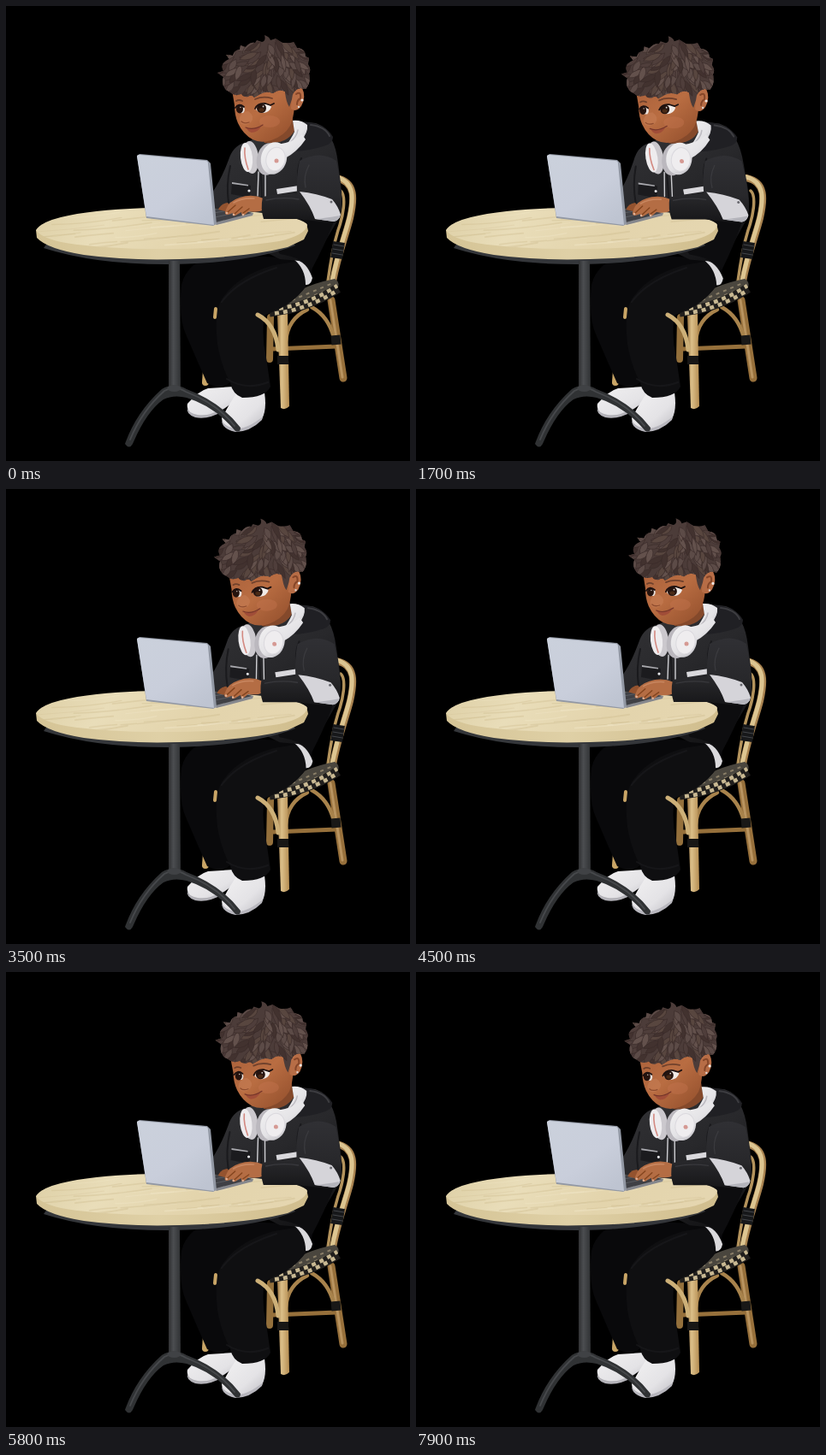
These frames come from a looping animation (472x532 px, 8000 ms). An HTML page:

```html
<!DOCTYPE html>
<html lang="en">
<head>
<meta charset="utf-8">
<title>Working at a café table</title>
<style>
html, body { margin: 0; width: 100%; height: 100%; overflow: hidden; background: #000; }
svg { display: block; width: 100vw; height: 100vh; }
.line { fill: none; stroke-linecap: round; stroke-linejoin: round; }
</style>
</head>
<body>
<svg viewBox="0 0 472 532">
  <defs>
    <linearGradient id="wood" x2="1" y2=".12">
      <stop stop-color="#ddcfa5"/><stop offset=".3" stop-color="#e9ddb9"/>
      <stop offset=".65" stop-color="#e3d4ac"/><stop offset="1" stop-color="#e5d6b0"/>
    </linearGradient>
    <linearGradient id="rim">
      <stop stop-color="#d5c496"/><stop offset=".45" stop-color="#dfd0a6"/><stop offset="1" stop-color="#d0bd8d"/>
    </linearGradient>
    <linearGradient id="lid" x2=".8" y2="1">
      <stop stop-color="#cbd1dc"/><stop offset=".6" stop-color="#c9cedb"/><stop offset="1" stop-color="#bec4d1"/>
    </linearGradient>
    <linearGradient id="skin" x2=".9" y2="1">
      <stop stop-color="#a9603a"/><stop offset=".5" stop-color="#b96d42"/><stop offset="1" stop-color="#94502d"/>
    </linearGradient>
    <linearGradient id="coat" x2=".6" y2="1">
      <stop stop-color="#343437"/><stop offset=".55" stop-color="#28282b"/><stop offset="1" stop-color="#151517"/>
    </linearGradient>
    <linearGradient id="sleeve" x2="0" y2="1">
      <stop stop-color="#303034"/><stop offset=".6" stop-color="#28282b"/><stop offset="1" stop-color="#161618"/>
    </linearGradient>
    <linearGradient id="white" x2="1" y2="1">
      <stop stop-color="#f2f1f2"/><stop offset=".6" stop-color="#e4e3e6"/><stop offset="1" stop-color="#bcbbc1"/>
    </linearGradient>
    <linearGradient id="cane">
      <stop stop-color="#9a7440"/><stop offset=".35" stop-color="#dcc08a"/><stop offset="1" stop-color="#b58d52"/>
    </linearGradient>
    <linearGradient id="metal">
      <stop stop-color="#2f3032"/><stop offset=".4" stop-color="#4b4d50"/><stop offset="1" stop-color="#303234"/>
    </linearGradient>
    <clipPath id="hairClip"><use href="#hair"/></clipPath>
    <clipPath id="topClip"><use href="#top"/></clipPath>
  </defs>

  <!-- chair -->
  <g class="line">
    <path stroke="#c9a566" stroke-width="8" d="M234 426L233 440"/>
    <path stroke="#94703c" stroke-width="8" d="M309 364L308 413"/>
    <path stroke="#96703b" stroke-width="5" d="M312 401L386 398"/>
    <path stroke="#97703b" stroke-width="9" d="M380 344L394 435"/>
    <path stroke="#b99460" stroke-width="3" d="M379 344L393 434"/>
    <path stroke="#a8834c" stroke-width="4.500" d="M357 352Q377 363 383 388M352 355Q329 366 327 392"/>
    <path stroke="#a98350" stroke-width="8" d="M386 201C409 206 407 226 402 248C397 268 388 290 382 322"/>
    <path stroke="#dcc591" stroke-width="5" d="M386 200C408 206 406 226 401 248C396 268 387 290 381 322"/>
    <path stroke="#b4935c" stroke-width="3.500" d="M391 216C398 222 394 246 388 262Q381 285 376 322"/>
    <path stroke="#17181a" stroke-width="14" stroke-linecap="butt" d="M389 276L386 295"/>
    <path stroke="#44464a" d="M383 279L395 281M382 284L394 286M381 289L393 291"/>
    <path stroke="#191817" stroke-width="11" stroke-linecap="butt" d="M385 385L386 396"/>
  </g>
  <path fill="#4a463e" d="M314 353Q338 328 384 319Q392 324 386 332Q350 352 314 353Z"/>
  <g class="line" style="stroke-linecap:butt">
    <path stroke="#8c8069" stroke-width="2" stroke-dasharray="4 5" d="M334 344L382 324M352 342L385 328"/>
    <path stroke="#211f1d" stroke-width="11" d="M308 358Q350 354 388 330"/>
    <path stroke="#c8b892" stroke-width="4.500" stroke-dasharray="5 5" d="M309 355Q350 351 387 327"/>
    <path stroke="#c8b892" stroke-width="4.500" stroke-dasharray="5 5" stroke-dashoffset="5" d="M309 360Q351 356 388 332"/>
  </g>
  <path fill="url(#cane)" d="M317 362L329 360L331 468Q326 473 321 470Z"/>
  <path fill="#171615" d="M317 409h13v10h-13z"/>

  <!-- legs and shoes -->
  <path fill="url(#white)" d="M236 447Q225 450 212 465Q210 475 222 480Q238 483 256 470L273 458L266 445Z"/>
  <path fill="#b4b3b9" d="M212 470Q213 476 224 478Q238 480 251 471L253 474Q236 484 221 481Q210 477 212 470Z"/>
  <path fill="url(#white)" d="M270 452Q262 463 252 482Q253 494 270 497Q283 497 299 483Q305 472 302 452Z"/>
  <path fill="#b8b7be" d="M252 485Q257 493 270 494Q283 494 300 480L299 484Q285 498 268 498Q253 495 252 485Z"/>
  <path fill="#09090b" d="M250 290L358 296Q360 325 338 340L300 364L262 440Q252 449 235 441Q223 414 211 386Q201 366 205 326Q212 297 250 290Z"/>
  <path fill="#0f0f11" d="M356 318Q340 350 302 361Q298 386 304 411L309 445Q303 458 276 458Q265 454 262 441Q247 411 246 384Q244 355 252 343Q270 315 313 303L355 296Z"/>
  <g class="line">
    <path stroke="#1a1a1d" stroke-width="2" d="M252 346Q270 321 316 306M258 436Q280 450 306 440" opacity=".7"/>
    <path stroke="#c9a566" stroke-width="4" d="M245 354L244 364"/>
    <path stroke="#cdb078" stroke-width="5" d="M294 361Q315 372 318 402"/>
  </g>

  <g class="lean">
    <!-- torso -->
    <path fill="#dad9dc" d="M336 296Q351 298 358 318Q356 327 350 326Q350 307 336 296Z"/>
    <path fill="url(#coat)" d="M278 160Q265 164 260 180Q251 204 241 218L239 256L320 296L354 299Q365 292 376 270L388 250Q395 236 391 207L388 184Q386 166 380 155Q377 142 362 137L345 135Z"/>
    <path fill="#0d0d0f" d="M293 244L384 249Q373 279 357 308Q347 294 320 290Z"/>
    <path fill="#202024" d="M348 136Q372 136 382 153Q382 160 374 163Q356 169 337 170Z"/>
    <path class="line" stroke="#3d3d41" stroke-width="2" d="M356 139Q373 141 378 152"/>
    <path class="line" stroke="#1a1a1d" stroke-width="2" d="M262 187Q257 209 260 230M298 197L299 228M345 178Q337 197 345 213"/>
    <path fill="#1b1b1e" d="M264 207L286 210L285 224L263 220Z"/>
    <path fill="#a9a9ae" d="M264 206L283 209L283 210.500L264 208Z"/>
    <path fill="#d9d8dc" d="M316 214L342 210L343 216L317 220Z"/>
    <g class="line" stroke="#cfcfd3" stroke-width="1.400"><path d="M295 194L294 222M303 194L303 223"/></g>
    <circle cx="284" cy="216" r="1.600" fill="#e8e8eb"/>
    <!-- neck and collar -->
    <path fill="#84492b" d="M294 146L334 126L337 146Q328 162 302 160Z"/>
    <path fill="url(#white)" d="M335 134Q345 133 352 139Q353 148 345 157L326 165Q334 154 337 147Z"/>
    <path class="line" stroke="#bcbac0" stroke-width="1.500" d="M341 145Q340 153 330 161"/>
    <!-- headphones -->
    <path fill="url(#white)" d="M317 162Q337 159 346 150L350 156Q340 171 326 178Z"/>
    <ellipse cx="286" cy="177" rx="9" ry="19" fill="#cbc8cd" transform="rotate(-6 286 177)"/>
    <ellipse cx="281" cy="177" rx="7" ry="17" fill="#eeecee" transform="rotate(-6 281 177)"/>
    <path class="line" stroke="#d38981" stroke-width="1.600" d="M279 166Q278 177 283 191"/>
    <ellipse cx="306" cy="179" rx="13" ry="19" fill="#bbb8be" transform="rotate(12 306 179)"/>
    <ellipse cx="313" cy="178" rx="15" ry="19" fill="url(#white)" transform="rotate(14 313 178)"/>
    <ellipse cx="315" cy="179" rx="11" ry="14" fill="#efedef" stroke="#dbd9de" transform="rotate(14 315 179)"/>
    <circle cx="316" cy="181" r="2.500" fill="#d59993"/>
  </g>

  <!-- head -->
  <g id="head">
    <path fill="url(#skin)" d="M263 92L267 116Q267 128 271 137Q277 150 288 156Q298 161 310 157Q325 152 332 140Q336 131 337 118L335 88Z"/>
    <path fill="#c88057" d="M277 124Q270 132 274 137Q280 141 286 136Q292 129 283 123Z" opacity=".5"/>
    <ellipse cx="308" cy="135" rx="12" ry="7" fill="#c67650" opacity=".4"/>
    <path class="line" stroke="#8f4d2f" stroke-width="1.300" d="M275 135Q278 138 284 136"/>
    <path fill="#a04d38" d="M281 143Q287 145 298 141Q294 148 287 148Q283 147 281 143Z"/>
    <path class="line" stroke="#75352a" stroke-width="1.200" d="M280 142Q289 146 300 139"/>
    <path fill="#b76d46" d="M334 101Q339 92 346 96Q351 106 345 117Q339 125 333 120Z"/>
    <path class="line" stroke="#854629" stroke-width="2" d="M339 103Q345 99 344 108Q340 110 340 115"/>
    <circle cx="346" cy="110" r="1.600" fill="#eee7e4"/><circle cx="342" cy="118" r="1.200" fill="#ddd5d2"/>
    <!-- eyes -->
    <path fill="#e9e1dc" d="M269 119Q273 114 278 118Q280 122 277 125Q271 126 269 119Z"/>
    <path fill="#f1ebe7" d="M292 121Q294 114 302 114Q309 115 310 118Q308 124 301 125Q295 125 292 121Z"/>
    <g id="gaze">
      <ellipse cx="273" cy="120.500" rx="4" ry="5" fill="#25130e"/>
      <ellipse cx="298.500" cy="119.500" rx="5.500" ry="5.500" fill="#25130e"/>
      <ellipse cx="298.500" cy="121.500" rx="3" ry="2.200" fill="#4a2a16"/>
      <g fill="#d9d2cc"><circle cx="274" cy="118.500" r=".7"/><circle cx="300.500" cy="117.500" r=".9"/></g>
    </g>
    <path class="line" stroke="#1d1110" stroke-width="1.800" d="M268 119Q272 113 278 118M291 120Q294 113 303 114L309 116L313 114"/>
    <path class="line" stroke="#70412c" stroke-width="1.800" d="M269 111Q272 109 276 111M291 109Q300 105 311 108"/>
    <!-- hair -->
    <path id="hair" fill="#4c3c39" d="M257 98Q251 91 254 83L247 78L254 76Q249 67 261 62L257 57L265 58Q267 51 273 51L274 46L280 48Q285 42 291 43L293 40L299 42Q304 41 302 34Q308 36 309 40L315 38L323 43Q331 44 336 42L340 49Q350 50 350 59L354 61L353 68Q357 74 354 79Q357 89 350 97L344 96Q335 97 334 109L331 118Q327 112 326 100Q319 96 312 102Q304 99 297 103L290 107Q287 103 283 106Q278 107 275 103Q267 106 262 101Z"/>
    <g id="tufts" clip-path="url(#hairClip)"></g>
  </g>

  <!-- table -->
  <path fill="#34363a" d="M44 283Q106 303 195 302Q287 300 338 280L331 273L51 273Z"/>
  <path fill="url(#metal)" d="M190 298h13l1 151h-14z"/>
  <path fill="#303234" d="M139 512Q152 475 182 448Q196 439 211 448Q251 463 274 493Q274 499 268 497Q244 468 211 458Q196 454 184 460Q164 474 148 512Q144 519 139 512Z"/>
  <path class="line" stroke="#47494c" stroke-width="1.800" d="M145 507Q159 473 185 450Q197 443 210 451Q247 465 267 491"/>
  <ellipse cx="196.500" cy="447" rx="8" ry="4" fill="#404245"/>
  <path fill="url(#rim)" d="M35 262L36 271Q48 284 91 291Q143 298 203 296Q281 294 329 282L348 273L353 263L351 254Z"/>
  <path id="top" fill="url(#wood)" d="M35 262Q42 251 73 245Q112 237 175 236Q250 236 308 243Q348 248 352 256Q350 268 319 275Q269 283 199 284Q120 285 70 277Q42 272 35 262Z"/>
  <g id="grain" class="line" clip-path="url(#topClip)"></g>

  <!-- laptop deck -->
  <path fill="#85878d" d="M240 239L263 235L289 242L288 245L246 256L242 253Z"/>
  <path fill="#3f4045" d="M242 238L263 235L287 242L245 253Z"/>
  <path class="line" stroke="#606268" stroke-width=".8" d="M243 242L270 237M244 247L277 240"/>

  <g class="lean">
    <path id="far" fill="#94532f" d="M248 238Q251 231 259 230L264 236L256 240Z"/>
    <g id="hand">
      <path fill="#b46d44" d="M257 238Q260 228 273 224Q287 219 301 225L302 238Q294 242 284 240L279 244Q275 246 275 241L268 245Q264 246 265 242L259 244Q254 244 257 238Z"/>
      <path class="line" stroke="#84451f" stroke-width="1.400" d="M259 241L268 233M267 243L276 235M277 242L284 237"/>
      <path class="line" stroke="#c98760" stroke-width="1.600" d="M266 230Q276 224 290 225"/>
      <g fill="#deb096"><circle cx="258" cy="242" r="1.300"/><circle cx="266" cy="244" r="1.300"/><circle cx="277" cy="244" r="1.300"/></g>
    </g>
    <path fill="url(#sleeve)" d="M343 181Q367 168 386 181Q391 203 392 228Q393 246 385 253Q363 252 340 249L301 249Q297 237 300 223Q321 219 340 220Q339 199 343 181Z"/>
    <path class="line" stroke="#404045" stroke-width="1.300" d="M304 227Q322 223 342 226M354 186Q347 199 350 212" opacity=".7"/>
    <path fill="#d5d4d9" d="M343 217Q363 219 381 226Q388 234 391 244Q390 250 383 252L361 249Q356 234 343 217Z"/>
    <path fill="#b4b4bb" d="M361 249Q373 248 390 245Q389 251 383 252Z"/>
    <circle cx="380" cy="229" r="1.500" fill="#68686e"/>
  </g>

  <!-- laptop lid -->
  <path fill="#9298a4" d="M153 175L156 173L235 180L239 184L246 255L242 257L164 248Z"/>
  <path fill="url(#lid)" d="M153 176Q153 174 156 174L233 181Q236 181 236 184L243 256L164 246Z"/>
</svg>
<script>
const $ = id => document.getElementById(id);
const LOOP = 8000, STEP = 100;

let seed = 11;
const rnd = (a, b) => {
  seed = seed * 16807 % 2147483647;
  return a + (b - a) * seed / 2147483647;
};

function scatter(id, count, make) {
  let out = '';
  for (let i = 0; i < count; i++) out += make(i / count, i);
  $(id).innerHTML = out;
}

// Leaf-shaped locks fan out from the crown, upper ones over lower ones.
const tones = ['#5c4b47', '#42322f', '#63514c', '#4f3e3b', '#58463f'];
scatter('tufts', 120, (u, i) => {
  const x = rnd(254, 352), y = 102 - 62 * u;
  const turn = Math.atan2(y - 38, x - 306) * 180 / Math.PI + rnd(-40, 40);
  const len = rnd(11, 19), w = rnd(5, 8);
  return `<path transform="translate(${x} ${y}) rotate(${turn})" fill="${tones[i % 5]}"
    stroke="#3a2b29" stroke-width=".6" d="M-4 0Q${len / 3} ${-w} ${len} 2Q${len / 3} ${w} -4 0"/>`;
});
scatter('grain', 38, (u, i) => {
  const x = rnd(20, 320), y = rnd(238, 284), w = rnd(25, 95);
  return `<path d="M${x} ${y}q${w / 2} ${rnd(-4, 1)} ${w} ${-w * .1}"
    stroke="${i % 3 ? '#cdbb8e' : '#f0e6c8'}" stroke-width="${rnd(.6, 2.2)}" opacity=".4"/>`;
});

// time, body lean, head x, head y, head turn, gaze
const poses = [
  [0, 0, 0, 0, 0, 0],
  [900, -.034, -5, .8, -.2, -.6],
  [1700, -.046, -6.7, 1.2, -.3, -1],
  [2600, -.038, -5.3, 1, -.6, -1],
  [3500, -.02, -3, .6, -.8, -.8],
  [4500, 0, .7, .2, .4, 0],
  [5800, -.005, -.7, 0, -1.5, .3],
  [6600, .002, .7, -.4, .6, .5],
  [7900, -.008, -1.8, .8, -1.5, -.6]
];

// Smooth curve through the poses, without stopping at each one.
function slope(i, n) {
  const a = poses[i - 1], b = poses[i + 1];
  return a && b ? (b[n] - a[n]) / (b[0] - a[0]) : 0;
}

function poseAt(t) {
  const i = Math.max(1, poses.findIndex(p => p[0] >= t));
  const a = poses[i - 1], b = poses[i], span = b[0] - a[0];
  const u = (t - a[0]) / span, v = 1 - u;
  return a.map((p, n) => v * v * (1 + 2 * u) * p + u * u * (3 - 2 * u) * b[n]
    + span * u * v * (v * slope(i - 1, n) - u * slope(i, n)));
}

function draw(now) {
  const t = Math.floor(now % LOOP / STEP) * STEP;
  const [, lean, hx, hy, turn, gaze] = poseAt(t);
  for (const g of document.querySelectorAll('.lean'))
    g.setAttribute('transform', `matrix(1 0 ${-lean} 1 ${lean * 300} ${hy * .4})`);
  $('head').setAttribute('transform', `translate(${hx} ${hy}) rotate(${turn} 312 150)`);
  $('gaze').setAttribute('transform', `translate(${gaze} 0)`);
  const tap = Math.sin(t / 200 * Math.PI);
  $('hand').setAttribute('transform', `translate(${-.3 * tap} ${.6 * tap})`);
  $('far').setAttribute('transform', `translate(${.3 * tap} ${-.6 * tap})`);
  requestAnimationFrame(draw);
}
requestAnimationFrame(draw);
</script>
</body>
</html>
```
